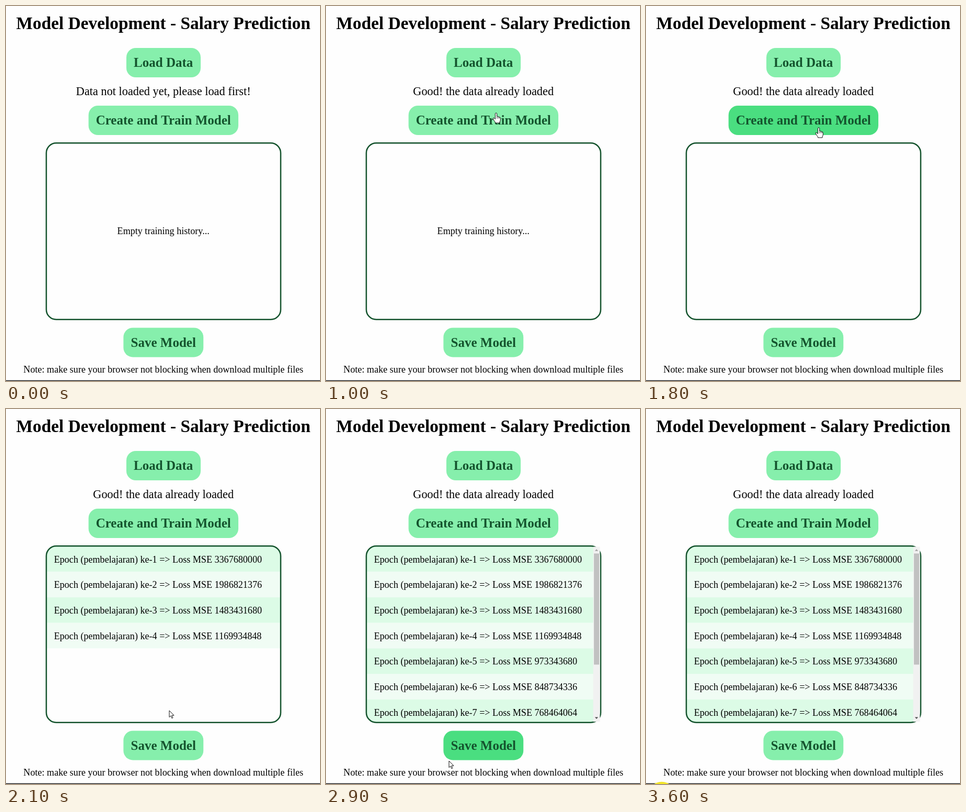
An HTML page with a canvas for the animation above (3.8 s loop, 600 by 715 pixels).

```html
<!DOCTYPE html>
<html lang="en">
<head>
<meta charset="utf-8">
<title>Model Development</title>
<style>
html, body { margin: 0; width: 100%; height: 100%; overflow: hidden; background: #fefefe; }
canvas { display: block; width: 600px; height: 715px; }
</style>
</head>
<body>
<canvas id="stage" width="600" height="715"></canvas>
<script>
const ctx = document.getElementById('stage').getContext('2d');
const LOOP = 3800, MID = 300.7;
const LIGHT = '#86efac', DARK = '#4ade80', INK = '#14532d';
const ROW = 48.65, VIEW = 333.6, EPOCHS = 10;
const losses = [3367680000, 1986821376, 1483431680, 1169934848, 973343680, 848734336, 768464064];

const hand = new Path2D('M-1.6 1.4Q-1.6 0 0 0Q1.6 0 1.6 1.4V6.6Q3.2 5.9 4 7.2' +
  'Q5.6 6.6 6.3 8Q8.3 7.8 8.3 10V13Q8.3 15.2 7 17V19H-1.6V17.5Q-3.6 15 -5.8 11.2' +
  'Q-6.2 9 -4.2 9.4L-1.6 11.6Z');
const arrow = new Path2D('M0 0V12.6L2.9 9.9L4.9 14.6L6.9 13.8L4.9 9.2H9Z');

// The pointer eases from each stop to the next.
const stops = [
  { t: 300, x: 400, y: 70 },
  { t: 600, x: 322, y: 112 },
  { t: 1000, x: 325, y: 204 },
  { t: 1800, x: 330, y: 232 },
  { t: 2100, x: 312, y: 575 },
  { t: 2400, x: 309, y: 606 },
  { t: 2900, x: 235, y: 671 },
  { t: 3100, x: 70, y: 725 }
];

const buttons = [
  { label: 'Load Data', x: 230, y: 80, w: 142, on: 500, off: 900 },
  { label: 'Create and Train Model', x: 157.7, y: 190, w: 286.3, on: 1100, off: 2000 },
  { label: 'Save Model', x: 224.4, y: 613.4, w: 152.8, on: 2600, off: 3000 }
];

const clamp = (v, lo, hi) => Math.min(hi, Math.max(lo, v));
const ease = k => k * k * (3 - 2 * k);

function text(str, x, y, size, { bold = false, color = '#000', align = 'center' } = {}) {
  ctx.font = `${bold ? 'bold ' : ''}${size}px "Liberation Serif", "Times New Roman", serif`;
  ctx.textAlign = align;
  ctx.fillStyle = color;
  ctx.fillText(str, x, y);
}

function rect(x, y, w, h, color) {
  ctx.fillStyle = color;
  ctx.fillRect(x, y, w, h);
}

function round(x, y, w, h, r) {
  ctx.beginPath();
  ctx.roundRect(x, y, w, h, r);
}

function button({ label, x, y, w, on, off }, t) {
  round(x, y, w, 56, 18);
  ctx.fillStyle = t >= on && t < off ? DARK : LIGHT;
  ctx.fill();
  text(label, MID, y + 36.2, 25, { bold: true, color: INK });
}

function triangle(x, y, h, color) {
  ctx.beginPath();
  ctx.moveTo(x - 3.2, y);
  ctx.lineTo(x + 3.2, y);
  ctx.lineTo(x, y + h);
  ctx.fillStyle = color;
  ctx.fill();
}

function scrollbar(content) {
  rect(510.6, 262.6, 12.8, VIEW, '#f1f1f1');
  rect(512, 275.5, 10, 309 * VIEW / content, '#c1c1c1');
  triangle(516.9, 270.8, -3.5, '#a3a3a3');
  triangle(516.9, 587.6, 3.5, '#505050');
}

function history(t) {
  const count = clamp(Math.floor((t - 1800) / 75), 0, EPOCHS);
  ctx.save();
  round(77.4, 261.6, 447.2, 336, 18.5);
  ctx.clip();
  losses.slice(0, count).forEach((loss, i) => {
    const y = 261.8 + i * ROW;
    rect(77, y, 448, ROW, i % 2 ? '#f0fcf4' : '#dcfbe6');
    text(`Epoch (pembelajaran) ke-${i + 1} => Loss MSE ${loss}`, 91.7, y + 30.8, 18.1, { align: 'left' });
  });
  ctx.restore();
  if (t < 1600) text('Empty training history...', MID, 435, 18.1);

  round(77, 261.3, 447.9, 336.4, 19);
  ctx.strokeStyle = INK;
  ctx.lineWidth = 2.5;
  ctx.stroke();
  if (count * ROW > VIEW) scrollbar(count * ROW);
}

function cursor(t) {
  const i = stops.findIndex(s => s.t > t) - 1;
  if (i < 0) return;
  const a = stops[i], b = stops[i + 1];
  const k = ease((t - a.t) / (b.t - a.t));
  const x = a.x + (b.x - a.x) * k, y = a.y + (b.y - a.y) * k;
  const over = buttons.some(s => x > s.x && x < s.x + s.w && y > s.y && y < s.y + 56);
  const shape = over ? hand : arrow;
  ctx.save();
  ctx.translate(x, y);
  ctx.fillStyle = '#fff';
  ctx.fill(shape);
  ctx.strokeStyle = '#111';
  ctx.lineWidth = 1;
  ctx.lineJoin = 'round';
  ctx.stroke(shape);
  if (over) {
    ctx.beginPath();
    for (const fx of [1.6, 4, 6.3]) {
      ctx.moveTo(fx, 7.5);
      ctx.lineTo(fx, 10.5);
    }
    ctx.lineWidth = 0.8;
    ctx.stroke();
  }
  ctx.restore();
}

function draw(t) {
  rect(0, 0, 600, 715, '#fefefe');
  text('Model Development - Salary Prediction', MID, 44, 33.33, { bold: true });
  buttons.forEach(b => button(b, t));
  text(t < 800 ? 'Data not loaded yet, please load first!' : 'Good! the data already loaded', MID, 170, 22.3);
  history(t);
  text('Note: make sure your browser not blocking when download multiple files', MID, 699.3, 18.1);
  rect(0, 713.6, 600, 1.4, '#202124');
  if (t >= 3500) {
    ctx.beginPath();
    ctx.arc(30, 736.8, 26, 0, Math.PI * 2);
    ctx.fillStyle = '#f2e52b';
    ctx.fill();
  }
  cursor(t);
}

// Ten steps a second, with every fifth one held.
function stepTime(ms) {
  const n = Math.floor(ms % LOOP / 100);
  return (n % 5 === 2 ? n - 1 : n) * 100;
}

const start = performance.now();
function tick() {
  draw(stepTime(performance.now() - start));
  requestAnimationFrame(tick);
}
tick();
</script>
</body>
</html>
```
